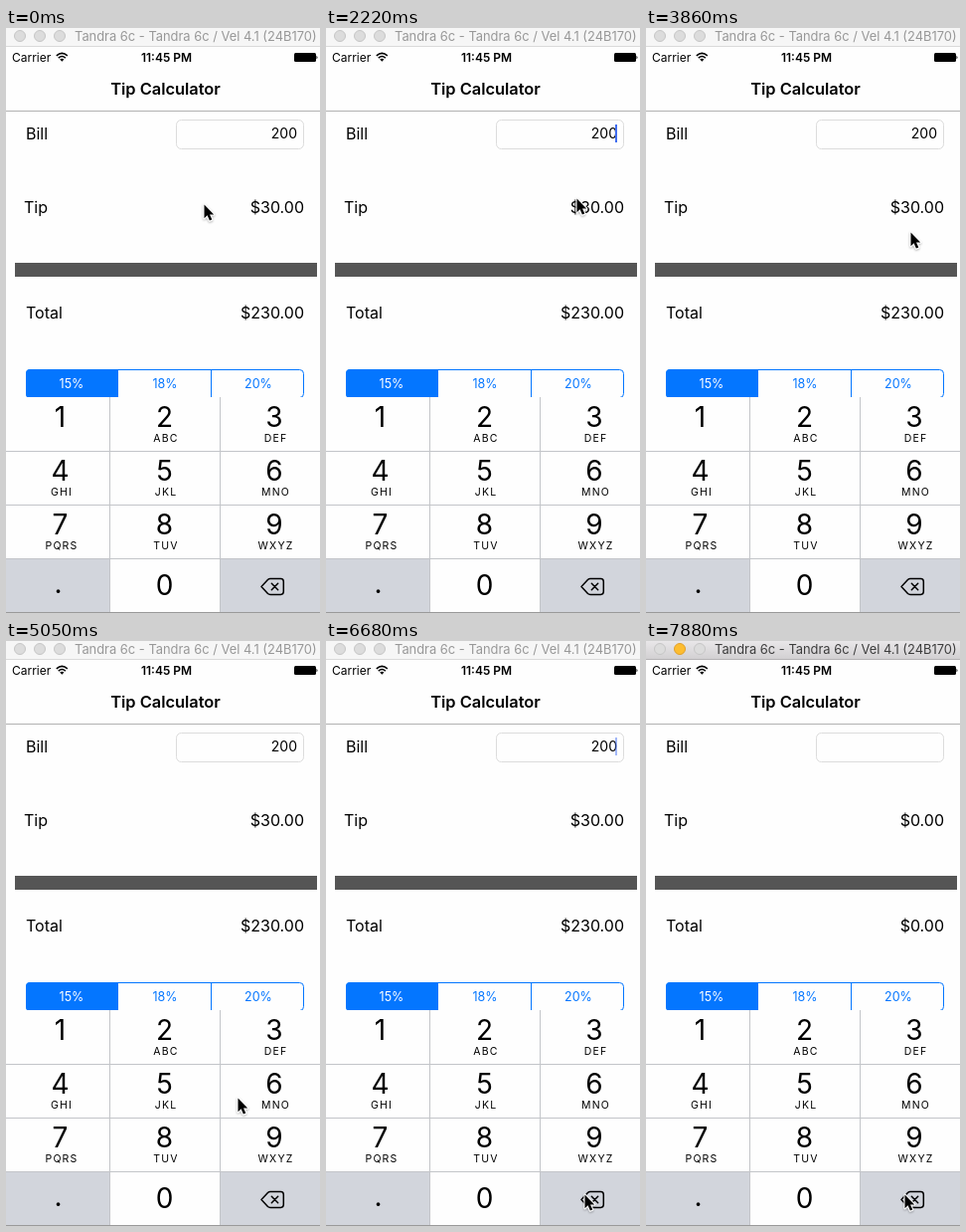
Write an HTML page that moves like this. It is 316 px wide and 588 px high and loops after 8 s.

```html
<!DOCTYPE html>
<html lang="en">
<head>
<meta charset="utf-8">
<title>Tip Calculator</title>
<style>
  html, body { margin: 0; width: 100%; height: 100%; overflow: hidden; background: #fefefe; }
  svg { display: block; width: 316px; height: 588px; }
  text { font-family: Inter, Roboto, "Liberation Sans", sans-serif; font-size: 16px; fill: #000; }
  .mid { text-anchor: middle; }
  .end { text-anchor: end; }
  .status { font-size: 12px; }
  .bold { font-weight: 600; }
  .heading { font-size: 16.4px; }
  .seg { font-size: 12.5px; fill: #0476ff; }
  .seg.chosen { fill: #fff; }
  .digit { font-size: 28px; }
  .abc { font-size: 10.5px; letter-spacing: 1.2px; }
  #bill { font-size: 14px; }
  #title { font-size: 12.9px; fill: #989898; }
  .light { fill: #dcdcdc; stroke: #c6c6c6; }
  .active #title { fill: #3d3d3d; }
  .active #minimise { fill: #fdbd30; stroke: #e0a02c; }
  .active #chrome { fill: url(#metal); }
  .active #chromeEdge { fill: #b4b2b4; }
</style>
</head>
<body>
<svg id="stage" viewBox="0 0 316 588">
  <defs>
    <linearGradient id="metal" x2="0" y2="1">
      <stop offset="0" stop-color="#e9e7e9"/>
      <stop offset="1" stop-color="#d2d0d2"/>
    </linearGradient>
    <filter id="shadow" x="-50%" y="-50%" width="200%" height="200%">
      <feDropShadow dx="0" dy="1" stdDeviation="0.8" flood-opacity="0.35"/>
    </filter>
  </defs>
  <rect width="316" height="588" fill="#fefefe"/>

  <!-- Window bar -->
  <rect id="chrome" width="316" height="18" fill="#f6f6f6"/>
  <rect id="chromeEdge" y="18" width="316" height="1" fill="#dadada"/>
  <circle class="light" cx="14" cy="8" r="5.5"/>
  <circle class="light" id="minimise" cx="34" cy="8" r="5.5"/>
  <circle class="light" cx="54" cy="8" r="5.5"/>
  <text id="title" x="69" y="13">Tandra 6c - Tandra 6c / Vel 4.1 (24B170)</text>

  <!-- Status and navigation -->
  <text class="status" x="6" y="34">Carrier</text>
  <g fill="none" stroke="#000" stroke-width="1.6">
    <path d="M50.8 27.8Q56.3 22.8 61.8 27.8M52.8 30.1Q56.3 26.9 59.8 30.1"/>
    <path d="M54.2 31.6Q56.3 29.8 58.4 31.6L56.3 33.8Z" fill="#000" stroke="none"/>
  </g>
  <text class="status bold mid" x="161.5" y="34">11:45 PM</text>
  <rect x="290" y="25" width="22" height="9" rx="1.5"/>
  <path d="M312.5 27.7Q314.5 29.5 312.5 31.3Z"/>
  <text class="heading bold mid" x="160.5" y="67">Tip Calculator</text>
  <rect y="83" width="316" height="1" fill="#b2b2b2"/>

  <!-- Form -->
  <text x="20" y="112">Bill</text>
  <rect x="171.5" y="92.5" width="128" height="29" rx="5" fill="#fefefe" stroke="#dcdcdc"/>
  <text id="bill" class="end" x="293" y="111"></text>
  <rect id="caret" x="291" y="97" width="2" height="18" fill="#416ef0"/>
  <text x="18" y="186">Tip</text>
  <text id="tip" class="end" x="300" y="186"></text>
  <rect x="9" y="236" width="304" height="14" fill="#555"/>
  <text x="20" y="292">Total</text>
  <text id="total" class="end" x="300" y="292"></text>

  <!-- Percentages -->
  <rect x="20.5" y="343.5" width="279" height="28" rx="4" fill="#fefefe" stroke="#0476ff"/>
  <path d="M113 343V372H24a4 4 0 0 1-4-4V347a4 4 0 0 1 4-4Z" fill="#0476ff"/>
  <path d="M206.5 343.5V371" stroke="#0476ff"/>
  <text class="seg chosen mid" x="66" y="362">15%</text>
  <text class="seg mid" x="160" y="362">18%</text>
  <text class="seg mid" x="254" y="362">20%</text>

  <!-- Keyboard -->
  <rect y="371" width="316" height="217" fill="#fefefe"/>
  <rect y="533" width="104" height="55" fill="#d2d5dc"/>
  <rect id="eraseKey" x="216" y="533" width="100" height="55" fill="#d2d5dc"/>
  <path d="M0 425.5H316M0 479.5H316M0 533.5H316M104.5 371V588M215.5 371V588" stroke="#c3c5c9"/>
  <g id="keys"></g>
  <g fill="none" stroke="#000" stroke-width="1.5" stroke-linejoin="round" stroke-linecap="round">
    <path d="M257 561.5L263.5 554.5Q264.5 553.6 266 553.6H276.5Q279.3 553.6 279.3 556.4V566.6Q279.3 569.4 276.5 569.4H266Q264.5 569.4 263.5 568.5Z"/>
    <path d="M267.3 558.3L273.7 564.7M273.7 558.3L267.3 564.7"/>
  </g>
  <rect y="587" width="316" height="1" fill="#9a9a9a"/>

  <g id="cursor" filter="url(#shadow)">
    <path d="M0.5 0.5V14.2L3.6 11.3L5.9 16.6L8.3 15.5L6 10.4H10.2Z" stroke="#fff" stroke-width="2" stroke-linejoin="round" paint-order="stroke"/>
  </g>
</svg>
<script>
const LOOP = 8000;
const TICK = 148.5;   // the screen refreshes in visible steps
const LEAD = 10;
const BLINK = 1000;
const FIRST_PRESS = 46;
const $ = id => document.getElementById(id);
const clamp = (v, max = 1) => Math.min(max, Math.max(0, v));

// Turning points of the pointer: tick, x, y.
const path = [
  [0, 199, 177], [5, 196, 427], [6, 189, 397], [8, 174, 353], [13, 252, 171],
  [22, 252, 171], [26, 266, 205], [30, 266, 205], [34, 233, 459],
  [35, 177, 531], [37, 171, 541], [41, 260, 556]
];

function pointer(tick) {
  const next = path.findIndex(point => point[0] > tick);
  if (next < 0) return path.at(-1).slice(1);
  const [from, x0, y0] = path[next - 1];
  const [to, x1, y1] = path[next];
  const k = (1 - Math.cos(Math.PI * (tick - from) / (to - from))) / 2;
  return [x0 + (x1 - x0) * k, y0 + (y1 - y0) * k].map(Math.round);
}

// Fades in, holds, then fades out once per blink.
function caretOpacity(tick) {
  const phase = tick * TICK % BLINK;
  return clamp((phase - 90) / 120) * clamp((760 - phase) / 160);
}

const money = n => "$" + n.toFixed(2);

function addText(cls, x, y, content) {
  const el = document.createElementNS("http://www.w3.org/2000/svg", "text");
  el.setAttribute("class", cls + " mid");
  el.setAttribute("x", x);
  el.setAttribute("y", y);
  el.textContent = content;
  $("keys").append(el);
}

["", "ABC", "DEF", "GHI", "JKL", "MNO", "PQRS", "TUV", "WXYZ"].forEach((abc, i) => {
  const x = [54.5, 159.5, 270][i % 3];
  const y = 401 + 54 * Math.floor(i / 3);
  addText("digit", x, y, i + 1);
  addText("abc", x + 1.5, y + 15, abc);
});
addText("digit", 159.5, 570, "0");
addText("digit", 52.5, 568, ".");

function draw() {
  const tick = Math.floor((performance.now() % LOOP + LEAD) / TICK);
  const presses = clamp(tick - FIRST_PRESS + 1, 3);
  const typing = presses > 0 && tick < FIRST_PRESS + 3;
  const bill = "200".slice(0, 3 - presses);
  const tip = bill * 0.15;

  $("cursor").setAttribute("transform", `translate(${pointer(tick)})`);
  $("caret").setAttribute("opacity", typing ? 1 : caretOpacity(tick));
  $("bill").textContent = bill;
  $("tip").textContent = money(tip);
  $("total").textContent = money(+bill + tip);
  $("stage").classList.toggle("active", presses > 0);
  $("eraseKey").setAttribute("fill", typing && presses < 3 ? "#fefefe" : "#d2d5dc");
  requestAnimationFrame(draw);
}
draw();
</script>
</body>
</html>
```
